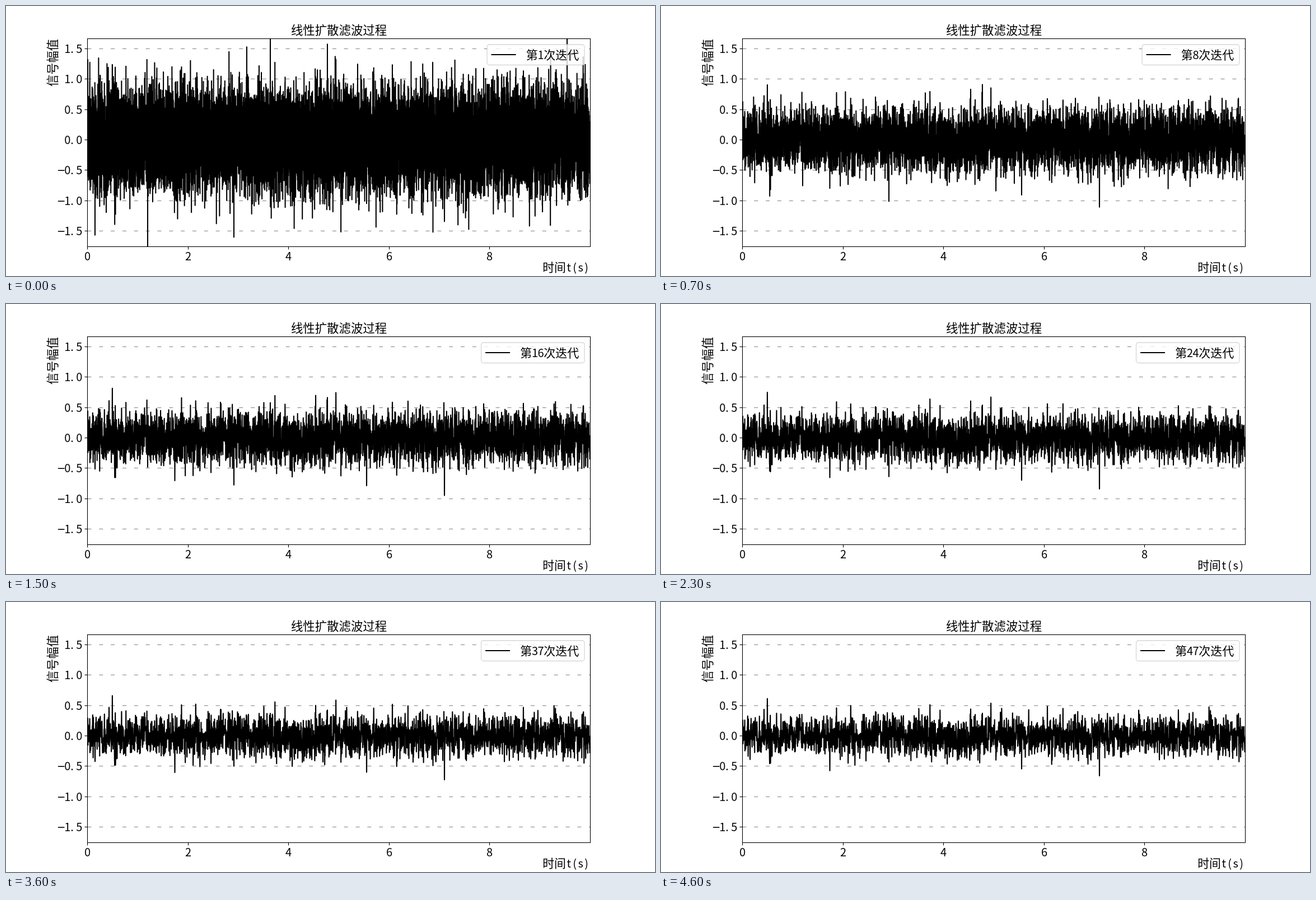
An HTML page with a canvas that plays this animation: 1159 px wide and 483 px high, repeating every 4.7 s.

```html
<!DOCTYPE html>
<html lang="zh">
<head>
<meta charset="utf-8">
<style>
  html, body { margin: 0; width: 100%; height: 100%; overflow: hidden; background: #fff; }
  canvas { display: block; }
</style>
</head>
<body>
<canvas id="stage" width="1159" height="483"></canvas>
<script>
const ctx = document.getElementById('stage').getContext('2d');
const STEP_MS = 100, STEPS = 47, SAMPLES = 20000, RATE = 0.1, SIGMA = 0.49;
const BOX = { left: 145.5, top: 58.5, right: 1043.5, bottom: 430.5 };
const BOX_W = BOX.right - BOX.left, BOX_H = BOX.bottom - BOX.top;
const ZERO_Y = 239.4, UNIT_Y = 108.6, UNIT_X = 89.8;
const FONT = '"Noto Sans CJK SC", "Noto Sans CJK", sans-serif';
const MINUS = '\u2212';

// The few outstanding peaks: x, height, and squared width in samples
const PEAKS = [
  { x: 253, height: -1.78, width: 0.1 },
  { x: 407, height: -1.6, width: 0.6 },
  { x: 472, height: 1.7, width: 0.2 },
  { x: 553, height: 1.05, width: 3 },
  { x: 574, height: 1.56, width: 0.5 },
  { x: 644, height: -1.05, width: 4 },
  { x: 783, height: -1.35, width: 2.5 }
];

function randomizer(seed) {
  return () => {
    seed = (seed + 0x6D2B79F5) | 0;
    let t = Math.imul(seed ^ (seed >>> 15), 1 | seed);
    t = (t + Math.imul(t ^ (t >>> 7), 61 | t)) ^ t;
    return ((t ^ (t >>> 14)) >>> 0) / 4294967296;
  };
}

const bell = (d, variance) => Math.exp(-d * d / (2 * variance));

function addPeak(u, { x, height, width }) {
  const mid = Math.round((x - BOX.left) / BOX_W * SAMPLES);
  const firstStepGain = 1 - 2 * RATE * (1 - bell(1, width));
  for (let d = -12; d <= 12; d++) {
    const noise = u[mid + d] * (1 - bell(d, width * 2 + 0.5));
    u[mid + d] = noise + height / firstStepGain * bell(d, width);
  }
}

function makeSignal() {
  const random = randomizer(2024);
  const u = new Float64Array(SAMPLES).map(() => {
    const r = Math.sqrt(-2 * Math.log(1 - random()));
    return SIGMA * r * Math.cos(2 * Math.PI * random());
  });
  PEAKS.forEach(peak => addPeak(u, peak));
  return u;
}

// One explicit step of the linear diffusion equation
function diffuse(u) {
  return u.map((v, i) => {
    const a = i ? u[i - 1] : v;
    const b = i < SAMPLES - 1 ? u[i + 1] : v;
    return v + RATE * (a + b - 2 * v);
  });
}

const states = [];
for (let u = makeSignal(); states.length < STEPS;) states.push(u = diffuse(u));

function segment(x1, y1, x2, y2, color, width, dash = []) {
  ctx.strokeStyle = color;
  ctx.lineWidth = width;
  ctx.setLineDash(dash);
  ctx.beginPath();
  ctx.moveTo(x1, y1);
  ctx.lineTo(x2, y2);
  ctx.stroke();
  ctx.setLineDash([]);
}

// Full-width cells for Chinese characters, half-width cells for the rest
const cellOf = (ch, em) => ch > '\u2fff' ? em : em / 2;
const widthOf = (text, em) => [...text].reduce((sum, ch) => sum + cellOf(ch, em), 0);

function drawText(text, x, baseline, em = 20.9) {
  ctx.fillStyle = '#000';
  ctx.textAlign = 'center';
  ctx.textBaseline = 'alphabetic';
  for (const ch of text) {
    const cell = cellOf(ch, em);
    const wide = cell === em;
    ctx.font = `${wide ? em : ch === MINUS ? 24 : 20}px ${FONT}`;
    const shift = ch === '.' ? -2.2 : ch === MINUS ? -0.8 : 0;
    const drop = ch === MINUS ? 1.2 : wide ? 0 : -0.5;
    ctx.fillText(ch, x + cell / 2 + shift, baseline + drop);
    x += cell;
  }
}

function drawSignal(u) {
  ctx.save();
  ctx.beginPath();
  ctx.rect(BOX.left, BOX.top, BOX_W, BOX_H);
  ctx.clip();
  ctx.beginPath();
  u.forEach((v, i) => ctx.lineTo(BOX.left + i / SAMPLES * BOX_W, ZERO_Y - v * UNIT_Y));
  ctx.strokeStyle = '#000';
  ctx.lineWidth = 2.08;
  ctx.lineJoin = 'round';
  ctx.stroke();
  ctx.restore();
}

const levelY = k => Math.floor(ZERO_Y - k / 2 * UNIT_Y) + 0.5;

function drawGrid() {
  for (let k = -3; k <= 3; k++) {
    segment(BOX.left, levelY(k), BOX.right, levelY(k), '#808080', 1, [6.94, 13.89]);
  }
}

function drawAxes() {
  ctx.strokeStyle = '#000';
  ctx.lineWidth = 1.1;
  ctx.strokeRect(BOX.left, BOX.top, BOX_W, BOX_H);
  for (let k = -3; k <= 3; k++) {
    const y = levelY(k);
    const label = (k < 0 ? MINUS : '') + Math.abs(k / 2).toFixed(1);
    segment(BOX.left - 5, y, BOX.left, y, '#000', 1.1);
    drawText(label, 136 - widthOf(label, 20.9), y + 7.8);
  }
  for (let v = 0; v < 10; v += 2) {
    const x = Math.floor(BOX.left + v * UNIT_X) + 0.5;
    segment(x, BOX.bottom, x, BOX.bottom + 5, '#000', 1.1);
    drawText(String(v), x - 5.2, 455);
  }
  drawText('线性扩散滤波过程', 594.5 - 4 * 21.4, 51, 21.4);
  drawText('时间t(s)', 958.2, 475.3);
  ctx.save();
  ctx.translate(82.5, 101.5);
  ctx.rotate(-Math.PI / 2);
  drawText('信号幅值', -42.4, 8, 21.2);
  ctx.restore();
}

function drawLegend(count) {
  const text = `第${count}次迭代`;
  const textX = 1023.3 - widthOf(text, 21);
  const left = textX - 69.7;
  ctx.beginPath();
  ctx.roundRect(left, 69, 1033 - left, 36.5, 4);
  ctx.fillStyle = 'rgba(255,255,255,0.8)';
  ctx.fill();
  ctx.strokeStyle = 'rgba(204,204,204,0.8)';
  ctx.lineWidth = 1.3;
  ctx.stroke();
  segment(left + 7.5, 87, left + 51.5, 87, '#000', 2);
  drawText(text, textX, 95, 21);
}

function draw(step) {
  ctx.fillStyle = '#fff';
  ctx.fillRect(0, 0, 1159, 483);
  drawGrid();
  drawSignal(states[step]);
  drawAxes();
  drawLegend(step + 1);
}

let shown = -1;
const start = performance.now();
function tick() {
  const step = Math.floor((performance.now() - start) / STEP_MS) % STEPS;
  if (step !== shown) draw(shown = step);
  requestAnimationFrame(tick);
}
tick();
</script>
</body>
</html>
```
